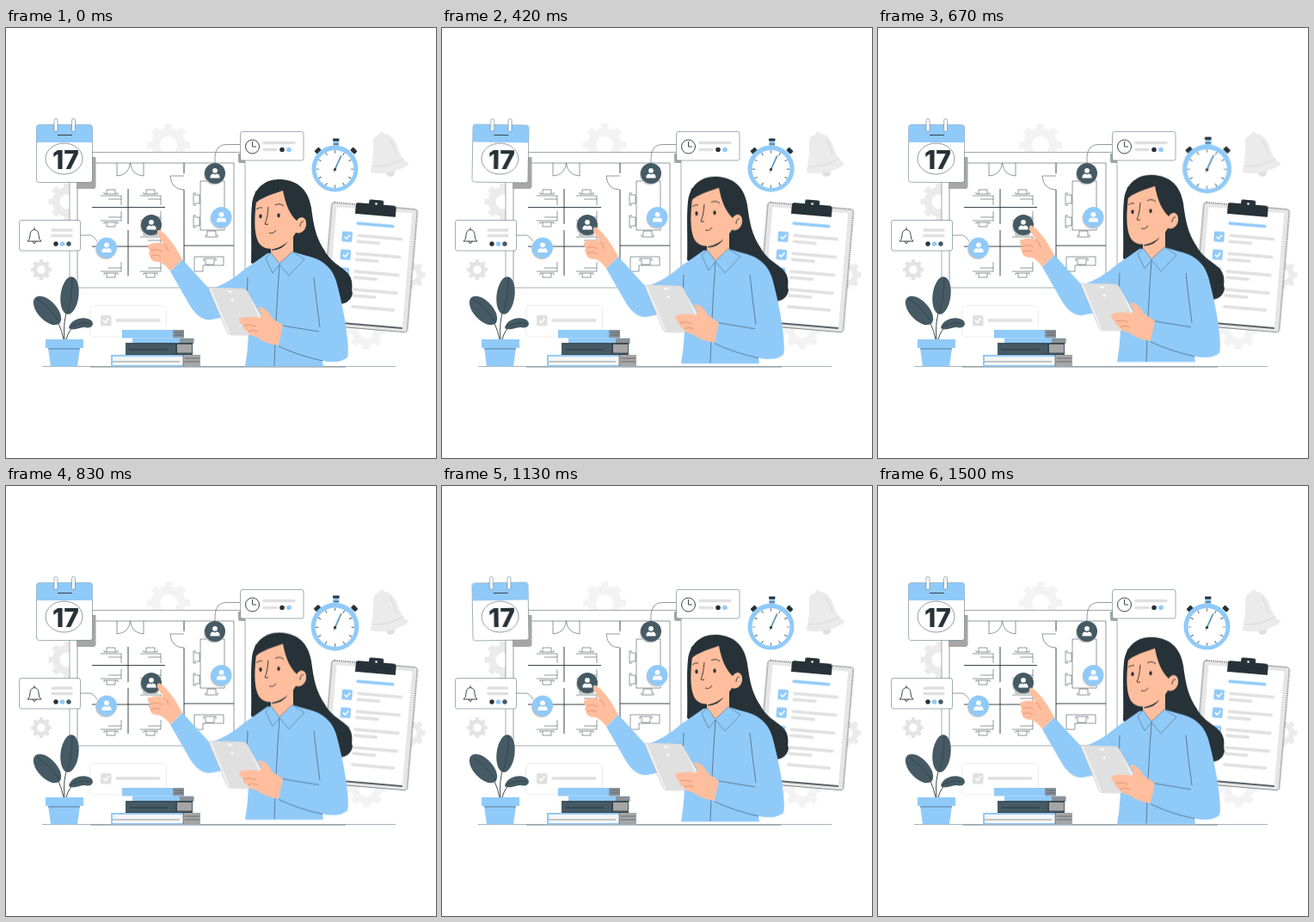
An HTML page without scripts for the animation above (1.54 s loop, 500x500 px).

```html
<!DOCTYPE html>
<html lang="en">
<head>
<meta charset="utf-8">
<title>Office planning</title>
<style>
  html, body { margin: 0; width: 100%; height: 100%; overflow: hidden; background: #fff; }
  svg { display: block; width: 100vw; height: 100vh; }
  .blue { fill: #90caf9; }
  .dark { fill: #263238; }
  .slate { fill: #455a64; }
  .grey { fill: #e0e0e0; }
  .skin { fill: #ffbe9d; }
  .white { fill: #fff; }
  .line { fill: none; stroke: #263238; stroke-width: .5; }
  .wall { fill: none; stroke: #263238; stroke-width: .9; }
  .bar { fill: none; stroke: #e0e0e0; stroke-width: 3.4; stroke-linecap: round; }
  .card { fill: #fff; stroke: #455a64; stroke-width: .5; }
  .tick { fill: none; stroke: #fff; stroke-width: 1.6; }
  .crease { fill: none; stroke: #d9825f; stroke-width: .7; }
  .woman, .watch, .calendar { animation: 1540ms linear infinite; }
  .woman { animation-name: float; }
  .watch { animation-name: beat; transform-origin: 382px 160px; }
  .calendar { animation-name: sway; transform-origin: 67px 146px; }
  @keyframes float { 50% { transform: translateY(-6px); } }
  @keyframes beat {
    0%, 28%, 70%, 100% { transform: none; }
    14%, 42% { transform: scale(1.06); }
  }
  @keyframes sway {
    25% { transform: rotate(1deg); }
    75% { transform: rotate(-1deg); }
  }
</style>
</head>
<body>
<svg viewBox="0 0 500 500">
  <defs>
    <g id="gear" fill="none" stroke="currentColor">
      <circle r="15" stroke-width="10"/>
      <circle r="22" stroke-width="6" pathLength="16" stroke-dasharray="1" stroke-dashoffset=".5"/>
    </g>
    <g id="person" class="white">
      <circle cy="-3.2" r="2.9"/>
      <path d="M-5.5 5.5V3.5Q-5 .6 -2 .4L0 1.6L2 .4Q5 .6 5.5 3.5V5.5Z"/>
    </g>
    <g id="desk" class="line">
      <path d="M-12 0H12V11M-3 4H12M-5 -2V-7H5V-2M-8 -4V-2H8V-4"/>
    </g>
    <g id="seat" class="line"><path d="M-3 -5H3V5H-3M-1 -7H-4V7H-1"/></g>
    <path id="lines" class="bar" d="M34 -3H84M34 4H59"/>
    <g id="row">
      <rect class="blue" x="15" y="-6.500" width="12" height="12" rx="1.500"/>
      <path class="tick" d="M18 -.5L20.500 2L24.500 -3"/>
      <use href="#lines"/>
    </g>
  </defs>

  <!-- background -->
  <g color="#f3f3f3">
    <use href="#gear" transform="translate(189 136)"/>
    <use href="#gear" transform="translate(71 202) scale(.86)" color="#ebebeb"/>
    <use href="#gear" transform="translate(41 281) scale(.48)" color="#e3e3e3"/>
    <use href="#gear" transform="translate(471 287) scale(.66)" color="#ebebeb"/>
    <use href="#gear" transform="translate(419 352) scale(.88)"/>
  </g>
  <circle cx="447" cy="168" r="5" fill="#e0e0e0"/>
  <path fill="#ebebeb" d="M427 133C427 126 431 125 434 124C434 120 439 120 440 123C446 123 451 128 454 135C458 147 461 153 468 157C468 163 438 173 424 168C424 163 428 151 427 133Z"/>
  <path fill="none" stroke="#e0e0e0" stroke-width="1.500" d="M427 161Q444 162 462 152M446 129Q451 137 454 147"/>
  <path d="M42 393.600H453" stroke="#455a64" stroke-width=".5"/>

  <!-- floor plan -->
  <rect class="card" x="74" y="144.500" width="204" height="157.500"/>
  <path d="M102 144.500H272" stroke="#a6a6a6" stroke-width="1.200"/>
  <path class="line" d="M83 144V302M83 157H265V302"/>
  <path class="wall" d="M207 157V169M207 188V302M207 253H265M100 208.500H185M100 254H185M142 187V228M142 235V288"/>
  <path class="line" d="M129 157V172Q143 171 144.500 157Q146 171 160 172V157M207 172H191Q192 188 207 188"/>
  <use href="#desk" x="122" y="195"/>
  <use href="#desk" x="168" y="195"/>
  <use href="#desk" transform="translate(122 224) scale(1 -1)"/>
  <use href="#desk" transform="translate(168 224) scale(1 -1)"/>
  <use href="#desk" x="168" y="243"/>
  <use href="#desk" transform="translate(122 283) scale(1 -1)"/>
  <use href="#desk" transform="translate(168 283) scale(1 -1)"/>
  <path class="line" d="M226 235V178H254V235ZM219 283V266H253V276H229V283Z"/>
  <use href="#seat" x="222" y="199"/>
  <use href="#seat" x="222" y="225"/>
  <use href="#seat" transform="translate(239 239) rotate(-90)"/>
  <use href="#seat" transform="translate(237 272) rotate(90)"/>
  <path class="line" d="M243 157V150Q244 135.500 256 135.500H272M86 241H98Q101 241 106 248"/>
  <g fill="#c7c7c7">
    <circle cx="168" cy="230.500" r="12"/><circle cx="242" cy="170.500" r="12"/>
    <circle cx="249.500" cy="221.500" r="12"/><circle cx="116" cy="257" r="12"/>
  </g>
  <circle class="slate" cx="169" cy="229" r="12"/><use href="#person" x="169" y="229"/>
  <circle class="slate" cx="243" cy="169" r="12"/><use href="#person" x="243" y="169"/>
  <circle class="blue" cx="250.500" cy="220" r="12"/><use href="#person" x="250.500" y="220"/>
  <circle class="blue" cx="117" cy="255.500" r="12"/><use href="#person" x="117" y="255.500"/>

  <!-- cards -->
  <path fill="#a6a6a6" d="M270 146H278V157H272Q270 157 270 155Z"/>
  <rect class="card" x="272.500" y="120.500" width="73.500" height="33.500" rx="2.500"/>
  <circle class="wall" cx="286.500" cy="138" r="8"/>
  <path class="wall" d="M286.500 132V138H291"/>
  <path class="bar" d="M300 133.500H335M300 141.500H314"/>
  <circle class="dark" cx="321" cy="141.500" r="2.800"/>
  <circle class="blue" cx="329" cy="141.500" r="2.800"/>

  <rect class="card" x="15.500" y="223.500" width="71" height="35.500" rx="2.500"/>
  <path class="wall" d="M25 248Q28 246 28 241Q28 235 33 234.500Q38 235 38 241Q38 246 41 248ZM33 234.500V232M31 248Q33 253 35 248"/>
  <path class="bar" d="M54 235H76M54 241.500H76"/>
  <circle class="dark" cx="58" cy="251" r="2.700"/>
  <circle class="blue" cx="65.500" cy="251" r="2.700"/>
  <circle class="slate" cx="73" cy="251" r="2.700"/>

  <rect x="97.500" y="322.500" width="89" height="36.500" rx="5" fill="#fff" stroke="#e0e0e0" stroke-width=".6"/>
  <rect class="grey" x="110" y="334" width="12.500" height="12.500" rx="2"/>
  <path class="tick" d="M113 340L115.500 342.500L119.500 337.500"/>
  <path class="bar" d="M129 340H178"/>

  <!-- calendar -->
  <path fill="#a6a6a6" d="M82 150H104.500V184Q104.500 187 101.500 187H82Z"/>
  <g class="calendar">
    <rect class="card" x="35.500" y="112.500" width="65" height="67" rx="3"/>
    <path class="blue" d="M35.500 133V115.500Q35.500 112.500 38.500 112.500H97.500Q100.500 112.500 100.500 115.500V133Z"/>
    <g class="card">
      <rect x="56" y="105.500" width="4" height="15" rx="2"/>
      <rect x="76.500" y="105.500" width="4" height="15" rx="2"/>
    </g>
    <path class="wall" d="M60 124.500H77"/>
    <ellipse class="line" cx="67.500" cy="152" rx="21.500" ry="18"/>
    <text class="dark" x="69.500" y="163.500" text-anchor="middle" font-family="Inter, sans-serif" font-size="30" font-weight="800">17</text>
  </g>

  <!-- stopwatch -->
  <g class="watch">
    <rect class="blue" x="380.500" y="130" width="6.500" height="9"/>
    <rect class="dark" x="380" y="128.500" width="7.500" height="3" rx="1"/>
    <path class="wall" d="M380.500 135H387"/>
    <g class="dark">
      <rect x="-3.500" y="-3" width="7" height="5" rx="1" transform="translate(363 143) rotate(-42)"/>
      <rect x="-3.500" y="-3" width="7" height="5" rx="1" transform="translate(404 143) rotate(45)"/>
    </g>
    <path class="wall" d="M365 145L368 149M402 145L399 149"/>
    <circle class="blue" cx="382.500" cy="163.500" r="27"/>
    <circle class="white" cx="382.500" cy="164" r="22"/>
    <circle cx="382.500" cy="164" r="20" fill="none" stroke="#263238" stroke-width="3.500" pathLength="120" stroke-dasharray=".7 9.300" stroke-dashoffset=".35"/>
    <path d="M382.500 164L389.500 149" stroke="#90caf9" stroke-width="2.200"/>
    <path class="line" d="M381 168L390 148"/>
    <circle class="dark" cx="382.500" cy="164.500" r="1.600"/>
  </g>

  <!-- clipboard -->
  <g transform="translate(379 202.500) rotate(4.900)">
    <rect width="100" height="143.500" rx="3" fill="#e6e6e6" stroke="#263238" stroke-width=".9" stroke-dasharray="1.500 1"/>
    <rect class="white" x="6" y="5" width="88" height="134"/>
    <path d="M6 139H94" stroke="#263238" stroke-width="1.600"/>
    <path class="dark" d="M28 11V1Q28 -2 31 -2H43V-5Q43 -7 45 -7H58Q60 -7 60 -5V-2H72Q75 -2 75 1V11Z"/>
    <circle class="white" cx="51.500" cy="-2.500" r="1.300"/>
    <path class="bar" style="stroke:#90caf9" d="M32 22H73"/>
    <use href="#row" y="39"/>
    <use href="#row" y="60"/>
    <use href="#row" y="81"/>
    <use href="#lines" y="102"/>
    <path class="bar" d="M34 119H82"/>
  </g>

  <!-- plant -->
  <path class="wall" stroke-width="1.500" d="M52 330Q63 342 67 362M72 325Q66 342 68 362M96 344Q76 340 70 362"/>
  <g class="slate">
    <ellipse rx="20.500" ry="11" transform="translate(48 328.500) rotate(47)"/>
    <ellipse rx="10.500" ry="22" transform="translate(74 311) rotate(7)"/>
    <path d="M73 349C75 337 94 334 100 341C103 346 98 350 92 348C86 347 80 353 73 349Z"/>
  </g>
  <path class="line" d="M36 315Q53 327 63 343M77 290Q77 315 71 332M74 348Q86 341 99 344"/>
  <path class="blue" d="M46 362H90V372H86L83 393.500H52L49 372H46Z"/>
  <path class="line" d="M49 373H86"/>

  <!-- books -->
  <path d="M98 394.200H395" stroke="#455a64" stroke-width=".5"/>
  <rect class="blue" x="135" y="351" width="72" height="9.500"/>
  <path fill="#8a9298" d="M194 351H207V360.500H194Z"/>
  <path class="line" d="M196 354H206M196 357H206"/>
  <rect class="blue" x="147" y="360.500" width="71" height="6.500"/>
  <rect x="202" y="361" width="16.500" height="6" fill="#8a9298"/>
  <rect class="slate" x="139" y="366.500" width="78" height="13"/>
  <rect x="199" y="368" width="17" height="9.500" fill="#a6a6a6"/>
  <path class="wall" d="M139 366.800H217M139 379.500H217M198 367V379M143 374H188"/>
  <rect class="blue" x="122" y="380" width="104" height="13.500"/>
  <rect fill="#f5f5f5" x="124" y="382" width="82" height="10"/>
  <rect x="206" y="380" width="20" height="13.500" fill="#a6a6a6"/>
  <path class="line" d="M124 388H202M206 380V393M208 384H225M208 388H225"/>

  <g class="woman">
    <path class="dark" d="M285 273C286 250 284 222 286 205C288 187 301 175 319 176C341 177 352 190 355 209C358 232 361 244 370 258C379 276 397 279 401 291C404 300 401 303 403 308C402 316 395 322 386 321L330 300Z"/>
    <!-- shirt -->
    <path class="blue" d="M304 262Q290 272 278 280Q259 297 237 304L205 269L191 283L214 323Q225 341 239 339Q262 335 281 325Q284 360 278 393.500H369L368 387Q388 391 397 383C400 375 395 336 386 302C382 282 372 270 350 265L333 260Z"/>
    <!-- neck and face -->
    <path class="skin" d="M308 250L334 236L334 262L318 274L308 264Z"/>
    <path class="dark" d="M309 257.500Q321 255 328 248Q322 258 309 258.500Z"/>
    <path class="skin" d="M291 201C289 219 288 237 293 248C297 257 309 259 318 254C327 250 333 245 337 238C344 240 350 234 349 226C348 219 341 218 338 224L325 186C309 188 297 192 291 201Z"/>
    <path class="dark" d="M287 208C292 199 304 195 322 189C325 205 330 217 338 224Q342 218 348 221L346 194L320 178L290 190Z"/>
    <path class="wall" d="M305 208Q304 222 301 228Q303 229 305 228M291 211Q294 208 298 209M313 206Q318 203 323 207M306 238Q311 240 314 235M342 231Q342 225 346 225"/>
    <ellipse class="dark" cx="296" cy="219" rx="1.700" ry="2.400"/>
    <ellipse class="dark" cx="317" cy="218" rx="1.700" ry="2.400"/>
    <!-- collar and seams -->
    <path class="blue" stroke="#455a64" stroke-width=".5" d="M308 261L318 274L333 260L347 269L329 288L318 275L310 285L302 268Z"/>
    <path class="line" d="M318 275Q314 330 312 393M281 290Q279 307 283 325M358 290Q361 320 365 348M317 370Q340 381 368 387M321 346L364 353"/>
    <!-- pointing hand -->
    <path class="skin" d="M205 269L197 255Q186 239 179 235Q175 234 176 240L183 251Q174 248 166 252Q163 256 168 259Q164 261 168 266Q168 272 178 272Q186 275 191 283Z"/>
    <path class="crease" d="M183 251Q188 254 189 260M168 259Q175 256 181 260M168 266Q174 262 180 266"/>
    <!-- tablet and holding hand -->
    <path fill="#f0f0f0" stroke="#a6a6a6" stroke-width=".4" d="M236 304Q235 302 239 302L277 303L280 305L300 340L297 357H263Q258 357 257 354Z"/>
    <path class="grey" d="M239 304Q238 302 242 302L275 303Q279 303 281 307L301 352Q302 357 298 357H266Q261 357 260 354Z"/>
    <path d="M258 306L263 307" stroke="#fff" stroke-width="1.500"/>
    <circle class="white" cx="263" cy="316" r="1.500"/>
    <path class="skin" d="M271 338Q281 334 294 337Q300 334 294 328Q292 323 298 325Q306 329 309 337L322 346L317 369Q301 367 291 359Q282 358 281 353Q275 351 276 346Q271 343 271 338Z"/>
    <path class="crease" d="M276 346Q284 344 291 347M281 353Q287 350 293 353"/>
  </g>
</svg>
</body>
</html>
```
